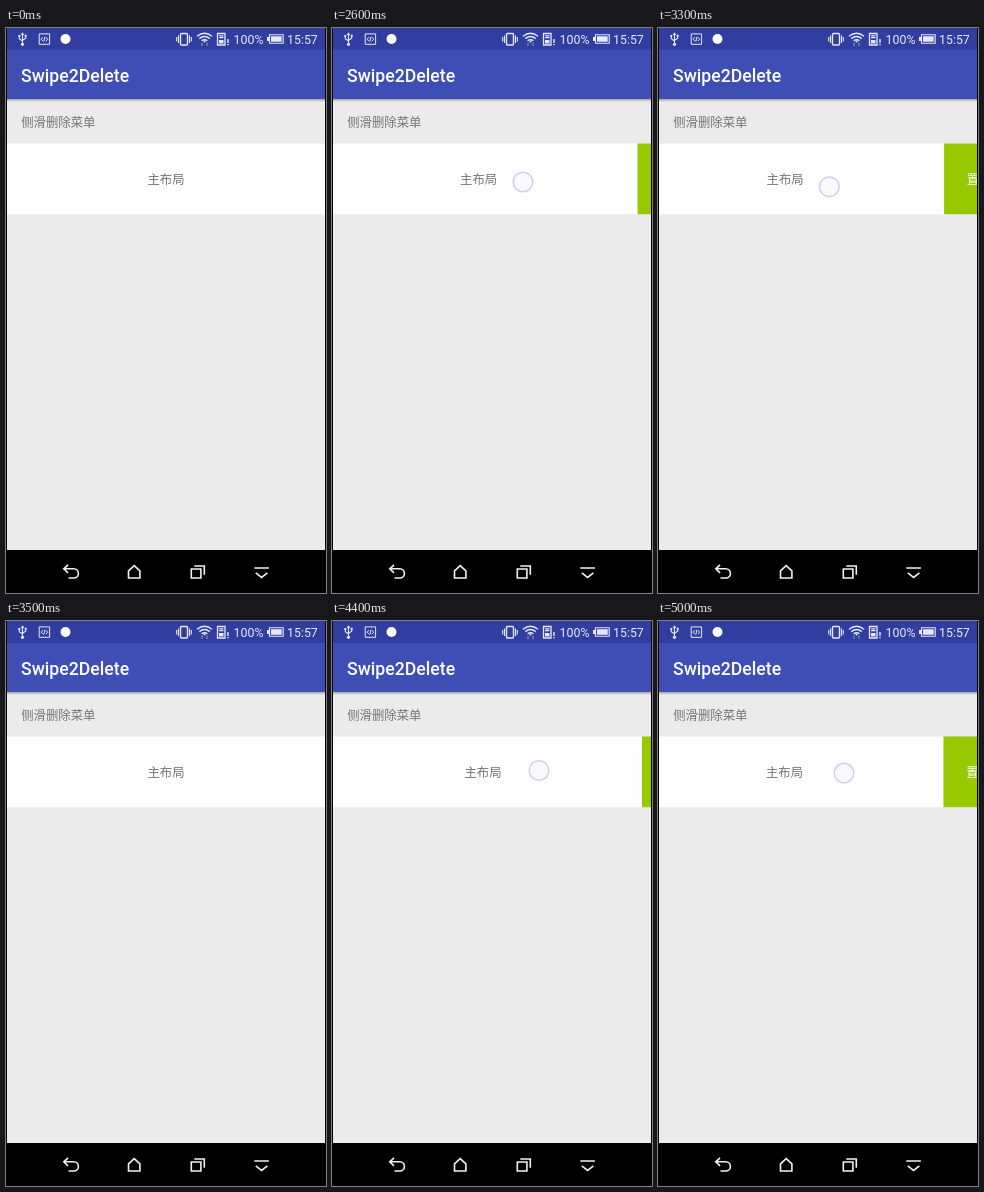
An HTML page that plays this animation: 320x565 px, repeating every 5100 ms.

```html
<!DOCTYPE html>
<html lang="zh-CN">
<head>
<meta charset="utf-8">
<title>Swipe2Delete</title>
<style>
  html, body { margin: 0; width: 100%; height: 100%; overflow: hidden; background: #000; }
  svg { display: block; width: 320px; height: 565px; }
  text { font: 12.37px Roboto, "Noto Sans CJK SC", sans-serif; }
  .cjk { font-family: "Noto Sans CJK SC", "Noto Sans CJK", sans-serif; fill: #747474; }
  .title { font-size: 17.67px; font-weight: 500; fill: #fff; }
  .line { fill: none; stroke: #e6e8f6; stroke-width: 1.1; }
  .nav { fill: none; stroke: #f2f2f2; stroke-width: 1.6; }
</style>
</head>
<body>
<svg viewBox="0 0 320 565">
  <defs>
    <clipPath id="screen"><rect x="1" y="0" width="318" height="522"/></clipPath>
    <linearGradient id="shade" x2="0" y2="1">
      <stop offset="0" stop-color="#000" stop-opacity=".3"/>
      <stop offset="1" stop-color="#000" stop-opacity="0"/>
    </linearGradient>
  </defs>
  <rect width="320" height="565"/>

  <g clip-path="url(#screen)">
    <rect width="320" height="522" fill="#ebebec"/>
    <text class="cjk" x="15.2" y="99">侧滑删除菜单</text>
    <g id="row">
      <rect x="1" y="115.5" width="318" height="70.7" fill="#fefefe"/>
      <text class="cjk" x="160" y="156" text-anchor="middle">主布局</text>
      <rect x="319" y="115.5" width="70" height="70.7" fill="#96c900"/>
      <text class="cjk" x="354" y="156" text-anchor="middle" style="fill:#fff">置顶</text>
    </g>
    <rect y="22" width="320" height="49" fill="#3f4eb4"/>
    <rect y="71" width="320" height="3" fill="url(#shade)"/>
    <rect width="320" height="22" fill="#313d9f"/>
    <text class="title" x="15" y="53.6">Swipe2Delete</text>
  </g>

  <!-- status icons -->
  <g class="line">
    <path d="M16.5 6v10M13.3 8.5v2.2l3.2 2.3M19.7 8v2.2l-3.2 2"/>
    <path d="M33.2 5.9h10.4v10.4H33.2zM36.9 9.2l-1.8 2 1.8 2M39.9 9.2l1.8 2-1.8 2M39 8.8l-1.2 4.8" stroke-width="1"/>
    <rect x="174.5" y="5.5" width="7" height="11.5" rx="1" stroke-width="1.4"/>
    <path d="M172.5 7.5v7.5M170.7 9v4.5M183.5 7.5v7.5M185.3 9v4.5"/>
    <path d="M191 8.2q7.5-6 15 0M193.3 10.6q5.2-4.2 10.4 0M195.6 12.8q2.9-2.2 5.8 0" stroke-width="1.4"/>
    <path d="M196 14.5v3.5M201 14.5v3.5" stroke="#8d95cf"/>
    <path d="M211.5 5.5h7.5v11.5h-7.5zM213.2 7.8h4.2M213.2 9.6h4.2" stroke-width="1.3"/>
    <path d="M222 11v4M222 16v1.3" stroke-width="1.4"/>
    <path d="M263.5 6.8h13.7v8.4h-13.7z"/>
  </g>
  <g fill="#e6e8f6">
    <path d="M16.5 4.2l1.8 2.8h-3.6zM12.3 7h2v2h-2zM18.7 6.8h2v2h-2z"/>
    <circle cx="16.5" cy="16.3" r="1.6"/>
    <circle cx="59.5" cy="11" r="5" fill="#fff"/>
    <circle cx="198.5" cy="13.6" r="1"/>
    <path d="M213 12h4.5v3.5H213zM265 8.3h10.7v5.4H265zM261 9h2.5v4H261z"/>
    <text x="227.6" y="16">100%</text>
    <text x="281" y="16">15:57</text>
  </g>

  <!-- navigation bar -->
  <g class="nav">
    <path d="M62 536.8l-4.2 4 4.2 4M58 540.8h9.8a4.6 4.6 0 0 1 0 9.2H62.5"/>
    <path d="M122.5 550v-7.2l5.7-5.2 5.7 5.2V550z"/>
    <path d="M185.3 541h9.6v9h-9.6zM188.3 538h10v8.8"/>
    <path d="M248.3 540h14.6M249.8 544.8l5.8 4.6 5.8-4.6"/>
  </g>

  <circle id="touch" r="9.8" fill="#f7f7ff" fill-opacity=".45" stroke-width="1.5"/>
</svg>
<script>
  const LOOP = 5100, STEP = 100;
  // Each drag: start time, touch point, vertical drift per px, finger travel and row shift per step
  const drags = [
    { at: 2200, x: 212, y: 148.8, drift: .245,
      travel: [0, 4, 9, 15, 21, 27, 33, 38, 43, 46, 45, 40.7],
      shift: [0, 0, 1, 7, 13.4, 19, 25, 30, 35, 38, 37, 32.9, 12, 0] },
    { at: 4200, x: 220, y: 147.8, drift: .125,
      travel: [0, 6, 13, 19, 24.4, 28, 30.5, 32.5, 34],
      shift: [0, 2, 9, 15, 20.8, 25.3, 28.5, 31, 33.5] }
  ];
  const row = document.getElementById('row');
  const touch = document.getElementById('touch');

  function draw(time) {
    const t = time % LOOP;
    const drag = drags[t < drags[1].at ? 0 : 1];
    const i = Math.floor((t - drag.at) / STEP);
    const d = drag.travel[i];
    row.setAttribute('transform', `translate(${-(drag.shift[i] || 0)} 0)`);
    touch.style.display = d === undefined ? 'none' : '';
    if (d !== undefined) {
      touch.setAttribute('cx', drag.x - d);
      touch.setAttribute('cy', drag.y + d * drag.drift);
      touch.setAttribute('stroke', t < 2300 ? '#d0d1d6' : '#d1cfeb');
    }
  }

  let start;
  function tick(now) {
    start ??= now;
    draw(now - start);
    requestAnimationFrame(tick);
  }
  draw(0);
  requestAnimationFrame(tick);
</script>
</body>
</html>
```
